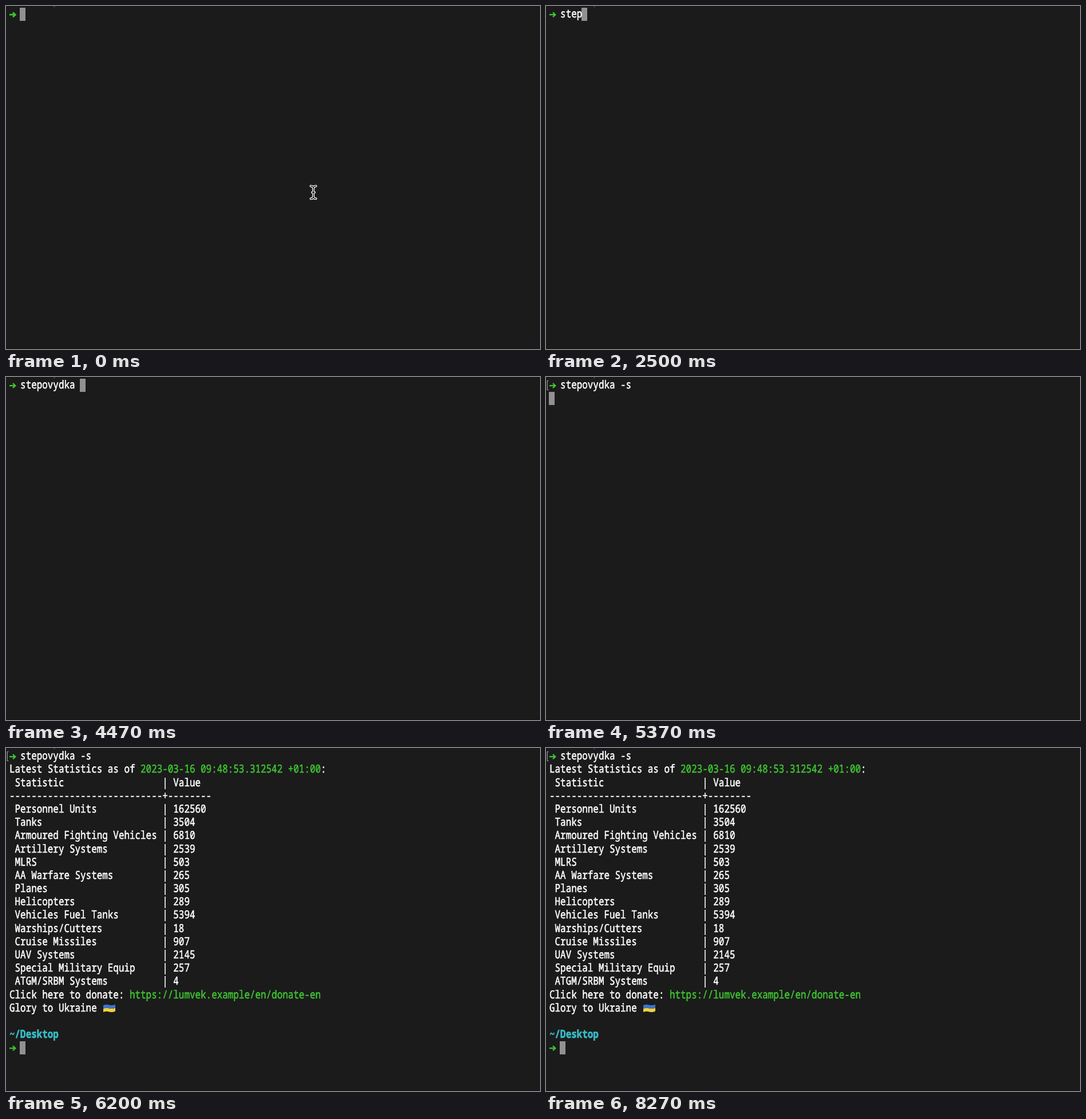
These frames come from a looping animation (933 px wide and 600 px high, 8.31 s). An HTML page:

```html
<!DOCTYPE html>
<html lang="en">
<head>
<meta charset="utf-8">
<title>Terminal</title>
<style>
  html, body { margin: 0; width: 100%; height: 100%; overflow: hidden; background: #1b1b1b; }
  #stage { position: relative; width: 933px; height: 600px; overflow: hidden; background: #1b1b1b; }
  #stage::after {
    content: ""; position: absolute; inset: 0;
    box-shadow: inset 0 1px 1px #141414, inset 0 -1px 1px #141414;
  }
  /* tall, narrow terminal face: 9.55 x 23.18 px cells */
  pre {
    position: absolute; left: 5.5px; top: 2.2px; margin: 0;
    font: 500 15.92px/19px "Noto Sans Mono", "DejaVu Sans Mono", monospace;
    font-variant-ligatures: none; text-rendering: geometricPrecision;
    -webkit-text-stroke: .5px currentColor;
    color: #fff; transform: scaleY(1.22); transform-origin: 0 0;
  }
  pre b { color: #38bdca; font-weight: 700; }
  pre i { color: #3fc432; font-style: normal; }
  #cmd.heavy { font-weight: 700; }
  #caret { position: absolute; left: 5px; top: 3px; width: 10px; height: 23px; background: #919191; }
  svg { position: absolute; left: 0; top: 0; }
  .arrow { fill: none; stroke: #3fc432; stroke-width: 2.3; }
  .arrow.heavy { stroke-width: 2.8; }
</style>
</head>
<body>
<div id="stage">
  <div id="caret"></div>
  <pre id="cmd"></pre>
  <pre id="out"></pre>
  <pre id="path"></pre>
  <svg width="933" height="600">
    <defs>
      <path id="tip" d="M6 15.2H16M12 11.2l4.3 4-4.3 4"/>
      <path id="beam" d="M-4.5-11q4.5 0 4.5 4V7q0 4-4.5 4M4.5-11Q0-11 0-7V7q0 4 4.5 4M-2 0H2"/>
      <path id="band" d="M170 1.5q5-2 10.500-.5t10.500-1v6q-5 2.500-10.500 1t-10.500.5z"/>
    </defs>
    <rect x="83" y="0" width="3" height="1.6" fill="#2a9aa5"/>
    <use id="arrow" class="arrow" href="#tip"/>
    <path id="mark" d="M4.6 6.5H2.2V22.5H4.6" fill="none" stroke="#a0a0a0" stroke-width="1.2"/>
    <g id="flag">
      <use href="#band" y="454.5" fill="#f3d03c"/>
      <use href="#band" y="448.5" fill="#3c74c8"/>
    </g>
    <use id="arrow2" class="arrow" href="#tip" y="510"/>
    <g id="mouse" fill="none" stroke-linecap="round" stroke-linejoin="round">
      <use href="#beam" stroke="#fff" stroke-width="4"/>
      <use href="#beam" stroke="#111" stroke-width="1.4"/>
    </g>
  </svg>
</div>
<script>
const LOOP = 8310, CELL = 9.552, ROW = 23.18;
const ENTER = 5230, PRINT = 5900, PROMPT = 5930, SETTLE = 1970;
const COMMAND = "stepovydka -s";
const KEYS = [1130, 1970, 2270, 2500, 2630, 2900, 3100, 3400, 3600, 3800, 4470, 4700, 4800];
const MOUSE = [[0, 537, 326], [300, 640, 367], [335, 795, 428], [370, -50, -50]];
const STATS = [
  ["Personnel Units", 162560], ["Tanks", 3504], ["Armoured Fighting Vehicles", 6810],
  ["Artillery Systems", 2539], ["MLRS", 503], ["AA Warfare Systems", 265],
  ["Planes", 305], ["Helicopters", 289], ["Vehicles Fuel Tanks", 5394],
  ["Warships/Cutters", 18], ["Cruise Missiles", 907], ["UAV Systems", 2145],
  ["Special Military Equip", 257], ["ATGM/SRBM Systems", 4]
];

const $ = id => document.getElementById(id);
const show = (id, on) => { $(id).style.visibility = on ? "visible" : "hidden"; };
const line = ([name, value]) => ` ${name.padEnd(27)}| ${value}`;

// the leading space keeps the first, empty row
$("out").innerHTML = " " + [
  "",
  "Latest Statistics as of <i>2023-03-16 09:48:53.312542 +01:00</i>:",
  line(["Statistic", "Value"]),
  "-".repeat(28) + "+" + "-".repeat(8),
  ...STATS.map(line),
  "Click here to donate: <i>https://lumvek.example/en/donate-en</i>",
  "Glory to Ukraine"
].join("\n");
$("path").innerHTML = " " + "\n".repeat(21) + "<b>~/Desktop</b>";

function caretAt(t, typed) {
  if (t < ENTER) return [2 + typed, 0];
  if (t < PRINT) return [0, 1];
  return t < PROMPT ? [0, 20] : [2, 22];
}

function draw(t) {
  const typed = KEYS.filter(k => k <= t).length;
  $("cmd").textContent = "  " + COMMAND.slice(0, typed);
  $("cmd").classList.toggle("heavy", t < SETTLE);
  $("arrow").classList.toggle("heavy", t < SETTLE);

  const [col, row] = caretAt(t, typed);
  $("caret").style.transform = `translate(${Math.round(col * CELL)}px, ${Math.round(row * ROW)}px)`;

  show("mark", t >= ENTER);
  show("out", t >= PRINT);
  show("flag", t >= PRINT);
  show("path", t >= PROMPT);
  show("arrow2", t >= PROMPT);

  const [, x, y] = MOUSE.filter(m => m[0] <= t).pop();
  $("mouse").setAttribute("transform", `translate(${x} ${y})`);
}

const start = performance.now();
function tick() {
  draw((performance.now() - start) % LOOP);
  requestAnimationFrame(tick);
}
tick();
</script>
</body>
</html>
```
